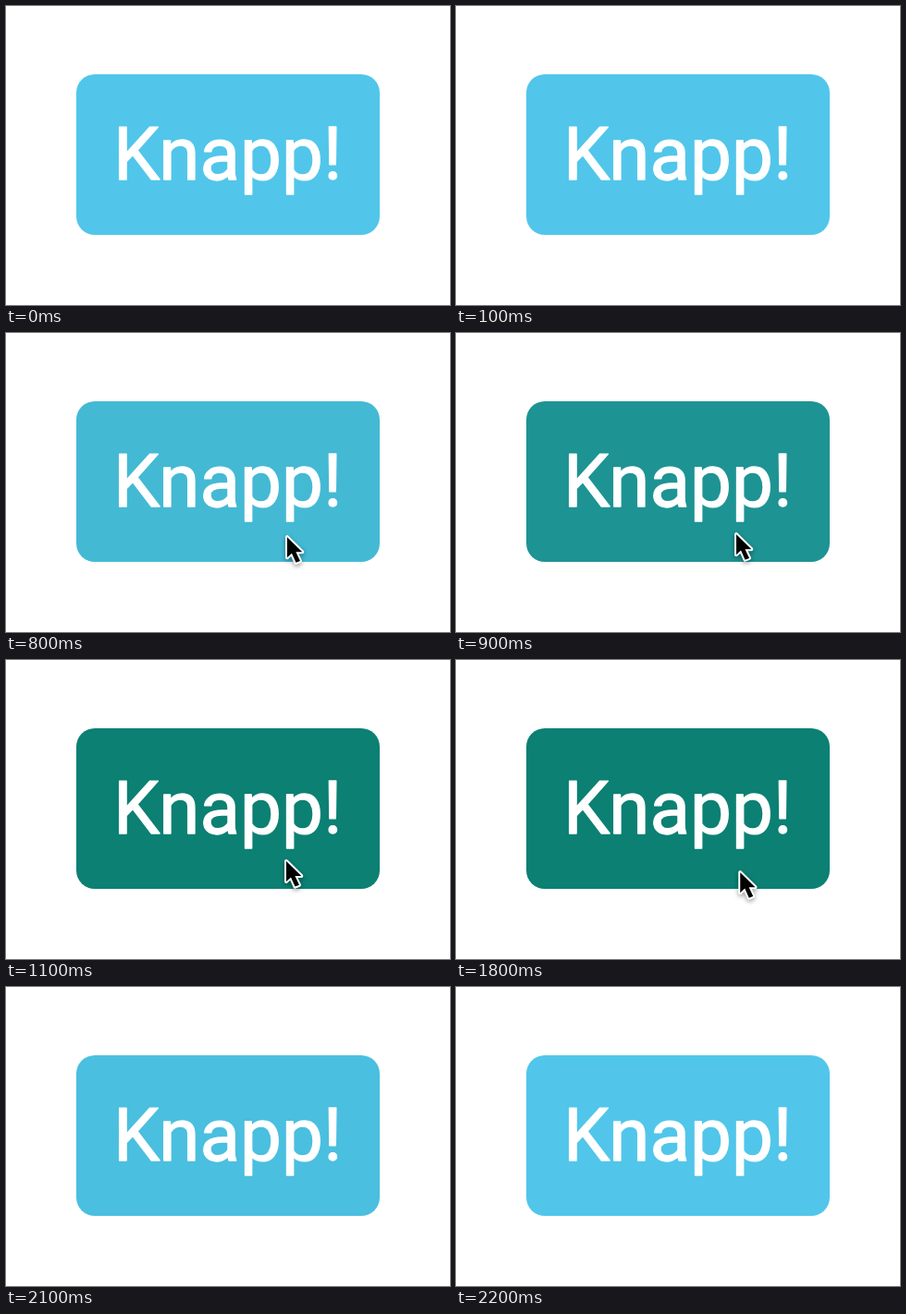
Write an HTML page with a canvas that moves like this. It is 480 px wide and 324 px high and loops after 2600 ms.

```html
<!DOCTYPE html>
<html lang="sv">
<head>
<meta charset="utf-8">
<style>
html, body { margin: 0; width: 100%; height: 100%; overflow: hidden; background: #fff; }
canvas { display: block; }
</style>
</head>
<body>
<canvas id="stage" width="480" height="324"></canvas>
<script>
const ctx = document.getElementById('stage').getContext('2d');
const LOOP = 2600, STEP = 100, FADE = 350;
const HOVER_IN = 747, HOVER_OUT = 1879;
const SHOW = 600, HIDE = 2000, GLIDE = 400, DEPART = 1700;
const REST = { x: 303, y: 218 };
const LIGHT = [81, 198, 234], DARK = [11, 128, 115];

const clamp = v => Math.min(1, Math.max(0, v));
const mix = (a, b, k) => a + (b - a) * k;

// CSS "ease": cubic-bezier(.25, .1, .25, 1)
function ease(x) {
  if (x <= 0 || x >= 1) return clamp(x);
  const bezier = (a, b, u) => 3 * a * u * (1 - u) ** 2 + 3 * b * u * u * (1 - u) + u ** 3;
  let lo = 0, hi = 1;
  for (let i = 0; i < 24; i++) {
    const mid = (lo + hi) / 2;
    if (bezier(.25, .25, mid) < x) lo = mid; else hi = mid;
  }
  return bezier(.1, 1, lo);
}

// The pointer glides in, rests on the button and speeds away below
function pointerAt(t) {
  const arrive = (1 - clamp((t - SHOW) / GLIDE)) ** 4.5;
  const leave = clamp((t - DEPART) / (HIDE - DEPART - STEP)) ** 2.5;
  return {
    x: REST.x + 22 * arrive + 24 * leave,
    y: REST.y + 73 * arrive + 69 * leave
  };
}

function drawButton(hover) {
  const rgb = LIGHT.map((c, i) => Math.round(mix(c, DARK[i], hover)));
  ctx.fillStyle = `rgb(${rgb})`;
  ctx.beginPath();
  ctx.roundRect(76, 74, 328, 174, 20);
  ctx.fill();
  ctx.fillStyle = ctx.strokeStyle = '#fff';
  ctx.font = '80px Roboto, sans-serif';
  ctx.lineWidth = 1.3;
  ctx.lineJoin = 'round';
  ctx.fillText('Knapp!', 116, 188);
  ctx.strokeText('Knapp!', 116, 188);
}

function drawPointer({ x, y }) {
  const arrow = new Path2D('M0 0V22L5 17.4L9.5 27.6L14 25.8L9.4 16H16.3Z');
  ctx.save();
  ctx.translate(x, y);
  ctx.lineWidth = 4;
  ctx.lineJoin = 'round';
  ctx.strokeStyle = '#fff';
  ctx.shadowColor = 'rgba(0, 0, 0, .4)';
  ctx.shadowBlur = 5;
  ctx.shadowOffsetY = 2;
  ctx.stroke(arrow);
  ctx.shadowColor = 'transparent';
  ctx.fillStyle = '#000';
  ctx.fill(arrow);
  ctx.restore();
}

function draw(now) {
  const t = Math.floor((now % LOOP) / STEP) * STEP;
  const hover = ease((t - HOVER_IN) / FADE) - ease((t - HOVER_OUT) / FADE);
  ctx.fillStyle = '#fff';
  ctx.fillRect(0, 0, 480, 324);
  drawButton(hover);
  if (t >= SHOW && t < HIDE) drawPointer(pointerAt(t));
}

const start = performance.now();
function frame() {
  draw(performance.now() - start);
  requestAnimationFrame(frame);
}
frame();
</script>
</body>
</html>
```
